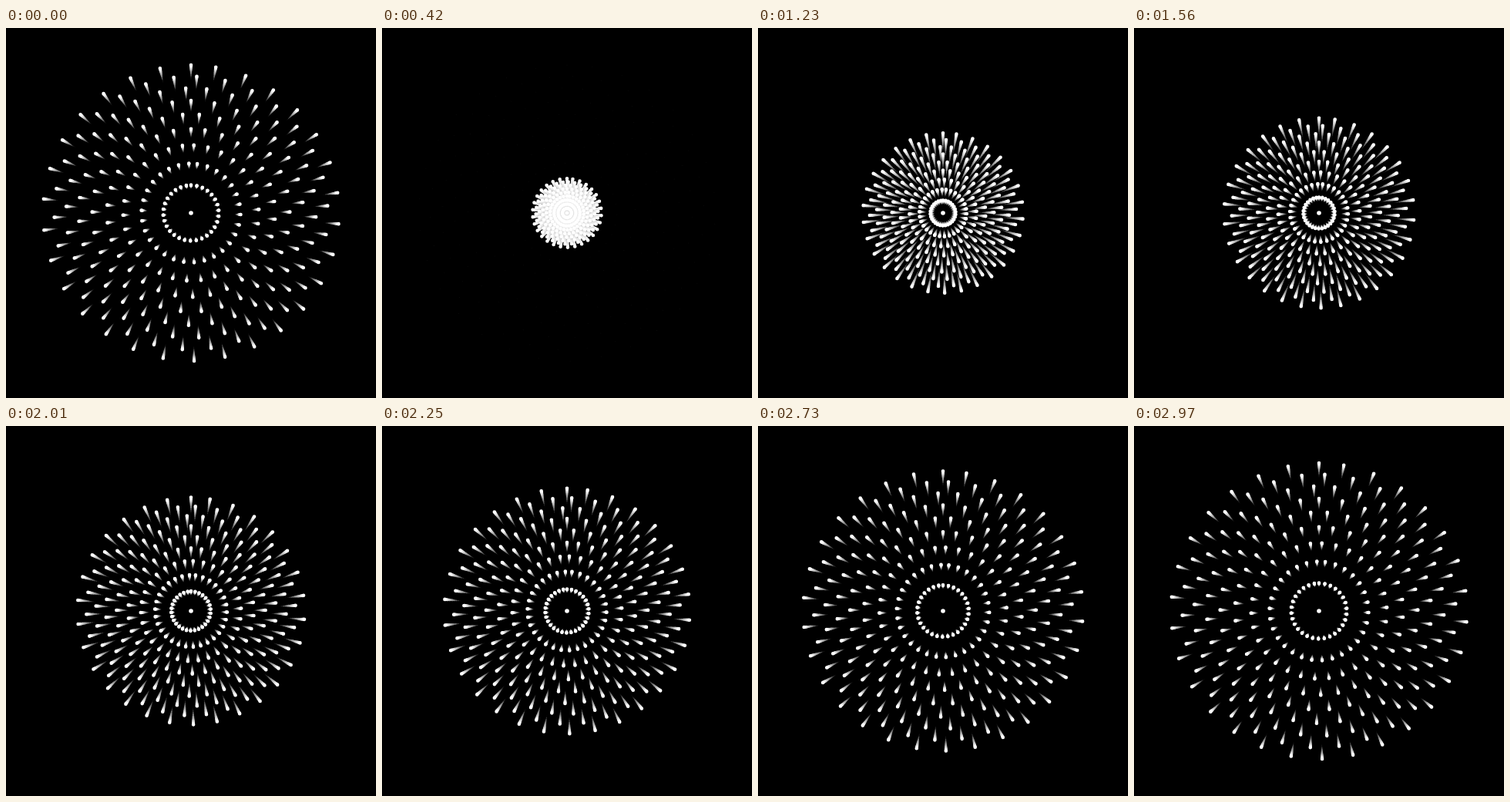
Animation, 480 px wide and 480 px high, one loop 3000 ms. Source, as an HTML page with a canvas:

```html
<!DOCTYPE html>
<html>
<head>
<meta charset="utf-8">
<style>
  html, body { margin: 0; width: 100%; height: 100%; overflow: hidden; background: #000; }
  canvas { display: block; }
</style>
</head>
<body>
<canvas id="stage" width="480" height="480"></canvas>
<script>
const ctx = document.getElementById('stage').getContext('2d');
const STEP = 30, LOOP = 3000, LAST = LOOP / STEP - 1;
const RINGS = 9, PER_RING = 30, TRAIL = 16;
const DOT = 2.3, HUB = 2.8;
const UNIT = 2 * Math.PI / 149;

// Decelerating distance from the centre
const reach = age => 92.3 * (Math.sqrt(1 + age / 350) - 1);

function dot(x, y, size) {
  ctx.moveTo(x + size, y);
  ctx.arc(x, y, size, 0, 2 * Math.PI);
}

function burst(age, size, shade) {
  ctx.fillStyle = `rgb(${shade},${shade},${shade})`;
  ctx.beginPath();
  for (let ring = 1; ring <= RINGS; ring++) {
    const r = reach(age * ring / RINGS);
    const shift = (ring - 1) * 3 % 5;
    for (let n = 0; n < PER_RING; n++) {
      const a = (5 * n + shift) * UNIT;
      dot(240 + r * Math.sin(a), 240 - r * Math.cos(a), size);
    }
  }
  ctx.fill();
}

function draw(time) {
  const now = Math.floor(time % LOOP / STEP) || LAST;
  ctx.fillStyle = '#000';
  ctx.fillRect(0, 0, 480, 480);
  // Older, dimmer and thinner copies lie underneath
  for (let back = TRAIL - 1; back >= 0; back--) {
    const step = now > back ? now - back : now - back + LAST;
    const life = 1 - back / TRAIL;
    burst(step * STEP, DOT * life, Math.round(255 * life));
  }
  ctx.beginPath();
  dot(240, 240, HUB);
  ctx.fill();
}

const start = performance.now();
function tick() {
  draw(performance.now() - start);
  requestAnimationFrame(tick);
}
tick();
</script>
</body>
</html>
```
